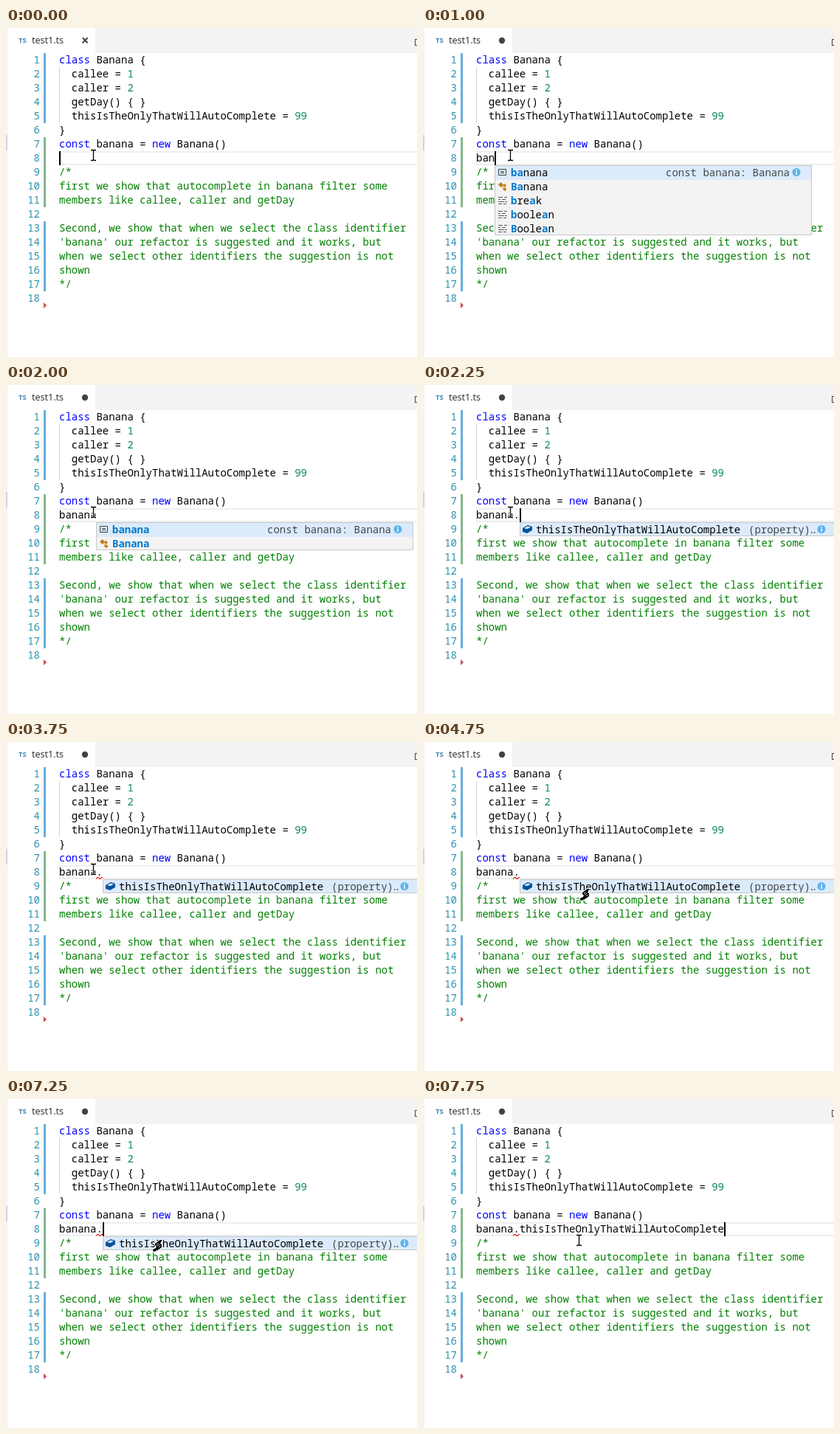
Animation of 557x446 px, one loop 8000 ms. Source, as an HTML page:

```html
<!DOCTYPE html>
<html lang="en">
<head>
<meta charset="utf-8">
<title>Autocomplete demo</title>
<style>
  html, body { margin: 0; width: 100%; height: 100%; overflow: hidden; background: #fff; }
  #stage { position: absolute; left: 0; top: 0; width: 557px; height: 446px; overflow: hidden; background: #fff; }
  #stage div, #stage svg { position: absolute; }
  .line, .row, .num { font: 14px/19px "Noto Sans Mono", monospace; white-space: pre; height: 19px; }
  .line { left: 72px; color: #000; }
  .num { left: 10px; width: 36px; text-align: right; color: #2b91af; }
  .k { color: #00f; }
  .n { color: #09885a; }
  .c { color: #008000; }
  .bar { left: 51px; width: 3px; height: 95px; background: #66afe0; }
  #current { left: 72px; top: 167px; width: 500px; height: 19px; box-sizing: border-box; border: 2px solid #eee; }
  #caret { top: 167px; width: 2px; height: 19px; background: #000; }
  #popup { top: 186px; width: 430px; box-sizing: border-box; overflow: hidden; background: #f3f3f3; border: 1px solid #c8c8c8; }
  .row { left: 0; width: 428px; }
  .row:first-child { background: #dcebfc; }
  .row div { top: -1px; }
  .row b { color: #007acc; font-weight: 700; }
  .label { left: 21px; }
  .detail { opacity: .7; }
  .cut { display: inline-block; width: 8px; overflow: hidden; vertical-align: top; font-family: "Noto Sans", sans-serif; }
  .row svg { left: 3px; top: 2px; }
  .row svg.info { left: 402px; }
</style>
</head>
<body>
<div id="stage">
  <div style="left:0;top:0;width:557px;height:34px;background:#f3f3f3"></div>
  <div style="left:2px;top:0;width:119px;height:34px;background:#fff"></div>
  <div style="left:0;top:0;width:2px;height:446px;background:#f3f3f3"></div>
  <div style="left:0;top:145px;width:2px;height:21px;background:#d4d2e3"></div>
  <div style="left:17px;top:10px;font:bold 9.5px/14px 'Noto Sans',sans-serif;color:#3f86b5">TS</div>
  <div style="left:35px;top:8px;font:12.5px/18px 'Noto Sans',sans-serif;color:#333">test1.ts</div>
  <svg width="557" height="34" style="left:0;top:0">
    <path id="close" d="M103.8 13.3l6.8 7m0-7l-6.8 7" stroke="#424242" stroke-width="2"/>
    <circle id="dirty" cx="107" cy="17" r="4.2" fill="#424242"/>
    <rect x="554.5" y="15.5" width="10" height="8" fill="none" stroke="#424242"/>
  </svg>
  <div class="bar" style="top:34px"></div>
  <div class="bar" style="top:148px;background:#81b88b"></div>
  <div class="bar" style="top:262px"></div>
  <svg width="5" height="8" style="left:51px;top:372px"><path d="M0 0l4 4-4 4z" fill="#ca4b51"/></svg>
  <div style="left:72px;top:53px;width:1px;height:76px;background:#d3d3d3"></div>
  <div id="current"></div>
  <div id="code"></div>
  <svg id="squiggle" width="9" height="3" style="left:122px;top:183px">
    <path d="M0 2.5l2-2h1l2 2h1l2-2h1" fill="none" stroke="#e01515" stroke-width="1.1"/>
  </svg>
  <div id="caret"></div>
  <div id="popup"></div>
  <svg id="mouse" width="557" height="446" style="left:0;top:0">
    <g id="beam" fill="none">
      <path d="M-3 -6.5h2l1.5 1l1.5-1h2M.5 -6v13M-3 7.5h2l1.5-1l1.5 1h2" stroke="#fff" stroke-width="3"/>
      <path d="M-3 -6.5h2.5l1 1l1-1h2.5M.5 -6v13M-3 7.5h2.5l1-1l1 1h2.5" stroke="#000" stroke-width="1.3"/>
    </g>
    <g id="arrow">
      <path d="M0 0v14l3.4-3l2.3 5l2-1l-2.2-4.8h4.8z" stroke="#fff" stroke-width="2"/>
      <path d="M0 0v14l3.4-3l2.3 5l2-1l-2.2-4.8h4.8z"/>
    </g>
    <g id="hand">
      <path d="M1 0h-3l-7 5v2l2 2l-1 2l-4 2v2l2 1l6-3l4-3v-4l-2-1l2-4z" stroke="#fff" stroke-width="2"/>
      <path d="M1 0h-3l-7 5v2l2 2l-1 2l-4 2v2l2 1l6-3l4-3v-4l-2-1l2-4z"/>
      <path d="M-7 6.500l2.500-2M-6 8.500l3-2.500M-4 10l2.500-2" stroke="#fff" stroke-width=".9"/>
    </g>
  </svg>
</div>
<script>
const LOOP = 8000, LEFT = 72, TOP = 33, ROW = 19, CHAR = 8.4;
const $ = id => document.getElementById(id);
const show = (id, on) => { $(id).style.display = on ? '' : 'none'; };

const source = [
  '<i>class</i> Banana {', '  callee = <u>1</u>', '  caller = <u>2</u>', '  getDay() { }',
  '  thisIsTheOnlyThatWillAutoComplete = <u>99</u>', '}',
  '<i>const</i> banana = <i>new</i> Banana()', '', '/*',
  'first we show that autocomplete in banana filter some',
  'members like callee, caller and getDay', '',
  'Second, we show that when we select the class identifier',
  "'banana' our refactor is suggested and it works, but",
  'when we select other identifiers the suggestion is not', 'shown', '*/', ''
];
const colour = s => s.replace(/<(i|u)>(.*?)<\/\1>/g,
  (_, tag, word) => `<span class="${tag === 'i' ? 'k' : 'n'}">${word}</span>`);
$('code').innerHTML = source.map((text, i) => {
  const y = `top:${TOP + i * ROW}px`;
  return `<div class="num" style="${y}">${i + 1}</div>` +
    `<div class="line${i > 7 ? ' c' : ''}" style="${y}">${colour(text)}</div>`;
}).join('');
const typedLine = document.querySelectorAll('.line')[7];

const icon = (body, cls = '') => `<svg class="${cls}" width="14" height="13">${body}</svg>`;
const icons = {
  variable: icon('<path d="M4 2.5H1.5v8H4M9 2.5h2.5v8H9M4 2.5h5M4 10.5h5M4 5.5h5M4 7.5h5" fill="none" stroke="#424242"/>'),
  class: icon('<path d="M1 4.5L4.5 1L8 4.5L4.5 8zM9 3l3 2-2 3-3-2zM9 8l3.5 2-2 3-3.5-2z" fill="#c27d1a"/><path d="M5 6l4 4" stroke="#c27d1a"/>'),
  keyword: icon('<path d="M1 2.5h6M9 2.5h4M1 5.5h3M6 5.5h5M1 8.5h8M10 8.5h3M1 11.5h5M8 11.5h4" stroke="#555"/>'),
  field: icon('<path d="M0 5l7-4l6 2v5l-7 4l-6-2z" fill="#00539c"/><path d="M2 5l5-2.5l4 1.2l-5 2.6z" fill="#dcebfc"/>'),
  info: icon('<circle cx="6" cy="6.5" r="5.5" fill="#5fb4e8"/><path d="M6 3v1.5M6 5.5v4.5" stroke="#fff" stroke-width="1.5"/>', 'info')
};

const bananaInfo = ['const banana: Banana', 231];
const menus = {
  ba: [['variable', '<b>ba</b>nana', bananaInfo], ['class', '<b>Ba</b>nana'],
    ['keyword', '<b>b</b>re<b>a</b>k'], ['keyword', '<b>b</b>oole<b>a</b>n'], ['keyword', '<b>B</b>oole<b>a</b>n']],
  bana: [['variable', '<b>bana</b>na', bananaInfo], ['class', '<b>Bana</b>na']],
  banana: [['variable', '<b>banana</b>', bananaInfo], ['class', '<b>Banana</b>']],
  member: [['field', 'thisIsTheOnlyThatWillAutoComplete', ['(property)<span class="cut">…</span>', 309]]]
};
const rowHtml = ([kind, label, detail], i) =>
  `<div class="row" style="top:${i * ROW}px">${icons[kind]}<div class="label">${label}</div>` +
  (detail ? `<div class="detail" style="left:${detail[1]}px">${detail[0]}</div>${icons.info}` : '') + '</div>';

// Each table lists [start ms, value...]; values hold until the next step.
const typing = [
  [0, '', ''], [1000, 'ban', 'ba'], [1250, 'bana', 'bana'], [1500, 'banana', 'banana'],
  [2250, 'banana.', 'member'], [7750, 'banana.thisIsTheOnlyThatWillAutoComplete', '']
];
const blink = [
  [0, 1], [250, 0], [1000, 1], [2000, 0], [2250, 1], [2750, 0], [3250, 1], [3750, 0],
  [4250, 1], [4750, 0], [5250, 1], [5750, 0], [7250, 1]
];
const pointer = [
  [0, 'beam', 118, 172], [4000, 'beam', 175, 172], [4250, 'arrow', 168, 187],
  [4500, 'beam', 202, 210], [4750, 'hand', 225, 199], [5000, 'hand', 249, 195],
  [5250, 'hand', 278, 190], [5750, 'hand', 250, 191], [6000, 'beam', 120, 178],
  [6500, 'hand', 209, 191], [7000, 'hand', 211, 191], [7750, 'beam', 211, 191]
];
const at = (table, t) => table.findLast(step => step[0] <= t);

let shownMenu = null;
function render(t) {
  const [, text, menu] = at(typing, t);
  const x = Math.round(LEFT + text.length * CHAR);
  typedLine.textContent = text;
  $('caret').style.left = x + 'px';
  show('caret', at(blink, t)[1]);
  show('close', t < 1000);
  show('dirty', t >= 1000);
  show('squiggle', t >= 2500);
  show('popup', menu);
  if (menu !== shownMenu) {
    const rows = menus[menu] || [];
    $('popup').innerHTML = rows.map(rowHtml).join('');
    $('popup').style.left = x + 'px';
    $('popup').style.height = rows.length * ROW + 'px';
    shownMenu = menu;
  }
  const [, shape, mx, my] = at(pointer, t);
  for (const id of ['beam', 'arrow', 'hand']) show(id, id === shape);
  $(shape).setAttribute('transform', `translate(${mx} ${my})`);
}

const start = performance.now();
function tick() {
  render((performance.now() - start) % LOOP);
  requestAnimationFrame(tick);
}
tick();
</script>
</body>
</html>
```
